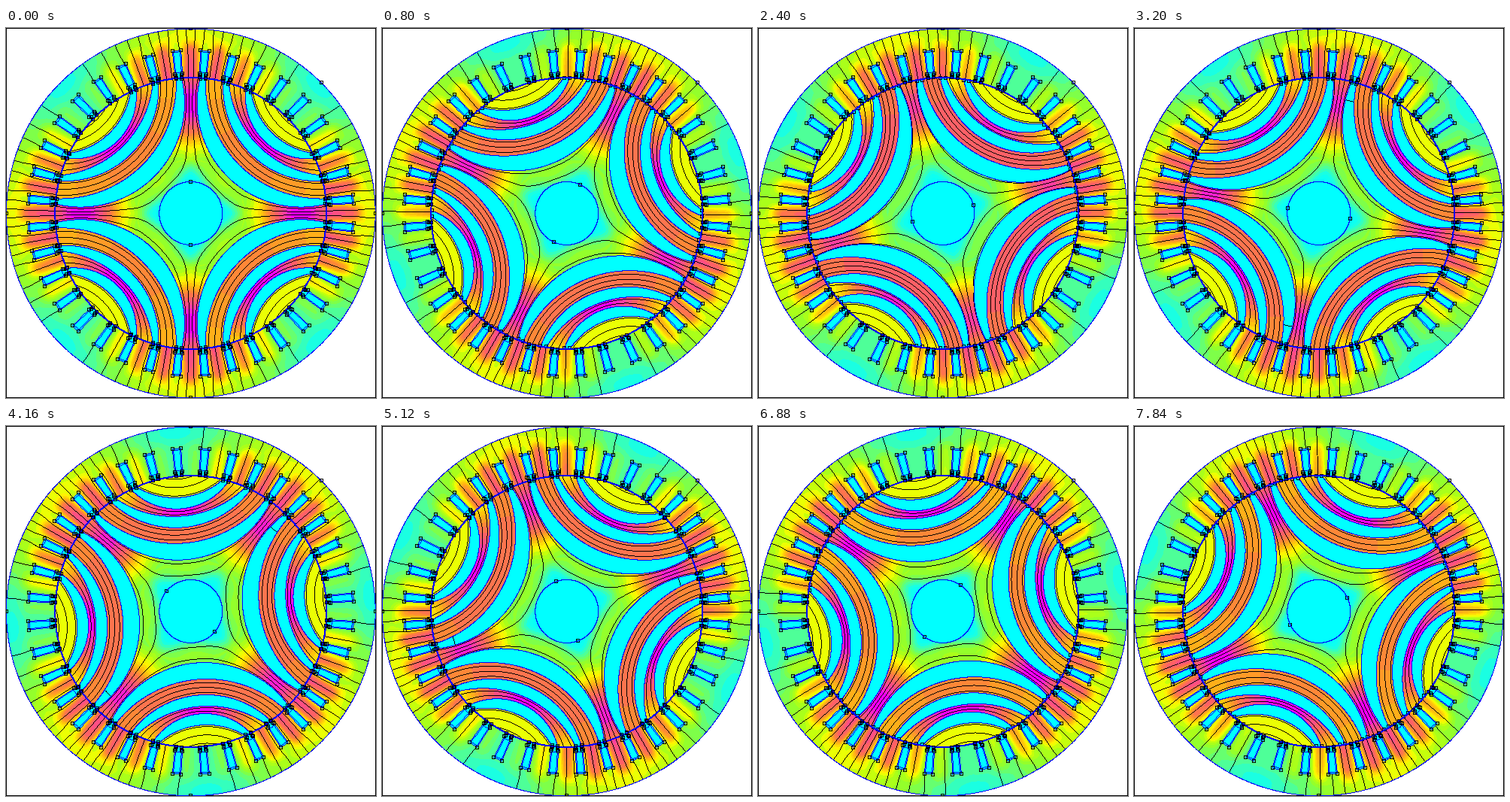
A matplotlib script for the animation above (8 s loop, 492 by 492 pixels).

```python
import numpy as np
import matplotlib.pyplot as plt
from matplotlib.animation import FuncAnimation
from matplotlib.colors import LinearSegmentedColormap

SIZE, DPI = 492, 100
FRAMES, STEP_MS = 50, 160
CX, CY = 245.3, 245.9
R_OUT, R_GAP, R_SHAFT = 245.4, 181.0, 42.0
B_MAX, B_KNEE = 0.0188, 0.014
BLACK, BLUE, CYAN = (0, 0, 0), (0, 0, 1), (0, 1, 1)

# Flux barrier edges: radius on the barrier axis, half angle at the air gap.
EDGES = [(69, 41.0), (91, 38.8), (112, 31.2),
         (127, 28.8), (137, 21.2), (152, 18.8)]

# Slot half width at each radius: outline and winding.
OUTLINE = [(R_GAP, 3.8), (184, 3.8), (186, 5), (217, 5.8)]
WINDING = [(188, 3.8), (215, 4.6)]
SLOTS = np.radians(5 + 10 * np.arange(36))

STOPS = [(0, (0, 255, 255)), (0.12, (20, 255, 235)), (0.22, (80, 255, 150)),
         (0.33, (140, 255, 50)), (0.42, (185, 255, 15)), (0.5, (255, 255, 0)),
         (0.62, (255, 190, 15)), (0.73, (255, 140, 50)),
         (0.83, (255, 95, 105)), (0.92, (255, 60, 165)), (1, (255, 0, 255))]
CMAP = LinearSegmentedColormap.from_list(
    "flux", [(p, np.array(c) / 255) for p, c in STOPS], N=24)


def edge_circle(vertex, half):
    """Centre, radius and half sweep of the arc through vertex and both tips."""
    u, v = R_GAP * np.sin(np.radians(half)), R_GAP * np.cos(np.radians(half))
    c = (u * u + v * v - vertex ** 2) / (2 * (v - vertex))
    return c, c - vertex, np.arctan2(u, c - v)


ARCS = [edge_circle(*e) for e in EDGES]


def polar(r, angle):
    return CX + r * np.cos(angle), CY - r * np.sin(angle)


def local(u, v, axis):
    """Point with offset u across and v along a radial axis."""
    return polar(np.hypot(u, v), axis + np.arctan2(u, v))


def barrier_axis(rot, q):
    return rot + q * np.pi / 2 + np.pi / 4


def stamp(img, x, y, color):
    col = np.clip(np.rint(x).astype(int), 0, SIZE - 1)
    row = np.clip(np.rint(y).astype(int), 0, SIZE - 1)
    img[row, col] = color


def stamp_circle(img, radius):
    stamp(img, *polar(radius, np.linspace(0, 2 * np.pi, 3000)), BLUE)


def stamp_path(img, pts, color):
    for (x0, y0), (x1, y1) in zip(pts, pts[1:]):
        t = np.linspace(0, 1, int(max(abs(x1 - x0), abs(y1 - y0))) + 2)
        stamp(img, x0 + (x1 - x0) * t, y0 + (y1 - y0) * t, color)


def stamp_nodes(img, x, y):
    """Hollow five-pixel squares."""
    x, y = np.rint(x), np.rint(y)
    for dx in range(-2, 3):
        for dy in range(-2, 3):
            if max(abs(dx), abs(dy)) == 2:
                stamp(img, x + dx, y + dy, BLACK)


yy, xx = np.mgrid[0:SIZE, 0:SIZE].astype(float)
RAD = np.hypot(xx - CX, yy - CY)
THETA = np.arctan2(CY - yy, xx - CX)
ROTOR = RAD < R_GAP
fade = np.clip((238 - RAD) / 26, 0, 1)
fade = fade * fade * (3 - 2 * fade)
# Flux squeezes into the teeth between the slots.
WARPED = THETA + 0.42 / 36 * fade * np.sin(36 * THETA)

slot_off = np.mod(THETA, np.pi / 18) - np.pi / 36
slot_h, slot_w = RAD * np.cos(slot_off), np.abs(RAD * np.sin(slot_off))
IN_SLOT = ((slot_h > R_GAP) & (slot_h < 217)
           & (slot_w < np.interp(slot_h, *zip(*OUTLINE))))


def rotor_potential(rot, swing):
    a1, a2, a3 = 0.18 + 0.02 * swing, 0.5 - 0.02 * swing, 0.73
    phi = THETA - rot
    q = np.floor(phi / (np.pi / 2))
    alpha = phi - q * np.pi / 2 - np.pi / 4
    sign = 1 - 2 * np.mod(q, 2)
    u, v = RAD * np.sin(alpha), RAD * np.cos(alpha)
    d = [R - np.hypot(u, v - c) for c, R, _ in ARCS]

    leg = RAD / 2 * np.cos(2 * alpha) * np.clip((RAD - 36) / 36, 0, 1)
    core = a1 * leg / (leg + np.maximum(-d[0], 0) + 1e-6)
    guide1 = a1 + (a2 - a1) * d[1] / (d[1] - d[2])
    guide2 = a2 + (a3 - a2) * d[3] / (d[3] - d[4])
    cap = a3 + 0.26 * d[5] / 29
    a = np.select([e < 0 for e in d], [core, a1, guide1, a2, guide2, a3], cap)
    barrier = ((d[0] >= 0) & (d[1] < 0) | (d[2] >= 0) & (d[3] < 0)
               | (d[4] >= 0) & (d[5] < 0))
    return sign * a, ROTOR & (barrier | (RAD < R_SHAFT))


def field_image(rot, swing):
    a_rot, air = rotor_potential(rot, swing)
    a_sta = np.sin(2 * (WARPED - rot))
    gy_r, gx_r = np.gradient(a_rot)
    gy_s, gx_s = np.gradient(a_sta)
    a = np.where(ROTOR, a_rot, a_sta)
    gx = np.abs(np.where(ROTOR, gx_r, gx_s))
    gy = np.abs(np.where(ROTOR, gy_r, gy_s))

    b = np.hypot(gx, gy)
    stator_b = np.hypot(b * (1 + 0.22 * fade), 0.0028 + 0.0015 * fade)
    b = np.where(ROTOR, b, stator_b)
    b = np.where(b > B_KNEE, (b + B_KNEE) / 2, b)      # iron saturation
    b[air] = 0
    img = CMAP(np.clip(b / B_MAX, 0, 1))[..., :3]
    img[IN_SLOT] = CYAN

    # One-pixel flux lines at equal steps of potential.
    level = a * 10 - 0.5
    off = np.abs(level - np.round(level)) / 10
    img[(off <= 0.5 * np.maximum(gx, gy)) & ~air & ~IN_SLOT] = BLACK
    img[RAD > R_OUT] = 1
    return img


def stamp_stator(img):
    for k in (0, SIZE - 1):
        img[k, :] = img[:, k] = BLACK
    for radius in (R_OUT, R_GAP, R_GAP - 1, R_SHAFT):
        stamp_circle(img, radius)
    nodes = [polar(R_OUT, np.radians(t)) for t in (0, 45, 90, 180, 270)]
    for angle in SLOTS:
        for profile in (OUTLINE, WINDING):
            pts = [local(w, r, angle) for r, w in profile]
            pts += [local(-w, r, angle) for r, w in reversed(profile)]
            stamp_path(img, pts + pts[:1], BLUE)
            if profile is OUTLINE:
                nodes += pts
    stamp_nodes(img, *np.array(nodes).T)


def stamp_rotor(img, rot):
    for q in range(4):
        for c, R, sweep in ARCS:
            s = np.linspace(-sweep, sweep, 600)
            x, y = local(R * np.sin(s), c - R * np.cos(s), barrier_axis(rot, q))
            stamp(img, x, y, BLUE)
    ends = np.radians([s * half for _, half in EDGES for s in (-1, 1)])
    for q in range(4):
        stamp_nodes(img, *polar(R_GAP - 1.5, barrier_axis(rot, q) + ends))
    shaft = rot + np.pi / 2 + np.array([0, np.pi])
    stamp_nodes(img, *polar(R_SHAFT, shaft))


def stamp_strays(img, rot, first):
    """Stray flux line across one barrier tip and its opposite."""
    c = ARCS[0][0]
    tip = np.radians(39.6)
    u, v = 155 * np.sin(tip), 155 * np.cos(tip)
    nu, nv = np.array([u, v - c]) / np.hypot(u, v - c)
    for q in (first, first + 2):
        ends = [local(u + k * nu, v + k * nv, barrier_axis(rot, q))
                for k in (-6, 6)]
        stamp_path(img, ends, BLACK)


fig = plt.figure(figsize=(SIZE / DPI, SIZE / DPI), dpi=DPI)
ax = fig.add_axes([0, 0, 1, 1])
ax.set_axis_off()
picture = ax.imshow(np.ones((SIZE, SIZE, 3)), interpolation="nearest")


def draw(i):
    rot = -np.radians(5 * i)
    # The rotor meets the same winding phase again every six steps.
    phase = i % 6
    swing = np.cos(2 * np.pi * (phase - 0.5) / 6)
    img = field_image(rot, swing)
    if phase in (2, 4):
        stamp_strays(img, rot, 1 if phase == 2 else 0)
    stamp_rotor(img, rot)
    stamp_stator(img)
    picture.set_data(img)
    return picture,


anim = FuncAnimation(fig, draw, frames=FRAMES, interval=STEP_MS,
                     init_func=lambda: draw(0), repeat=True, repeat_delay=0)
plt.show()
```
